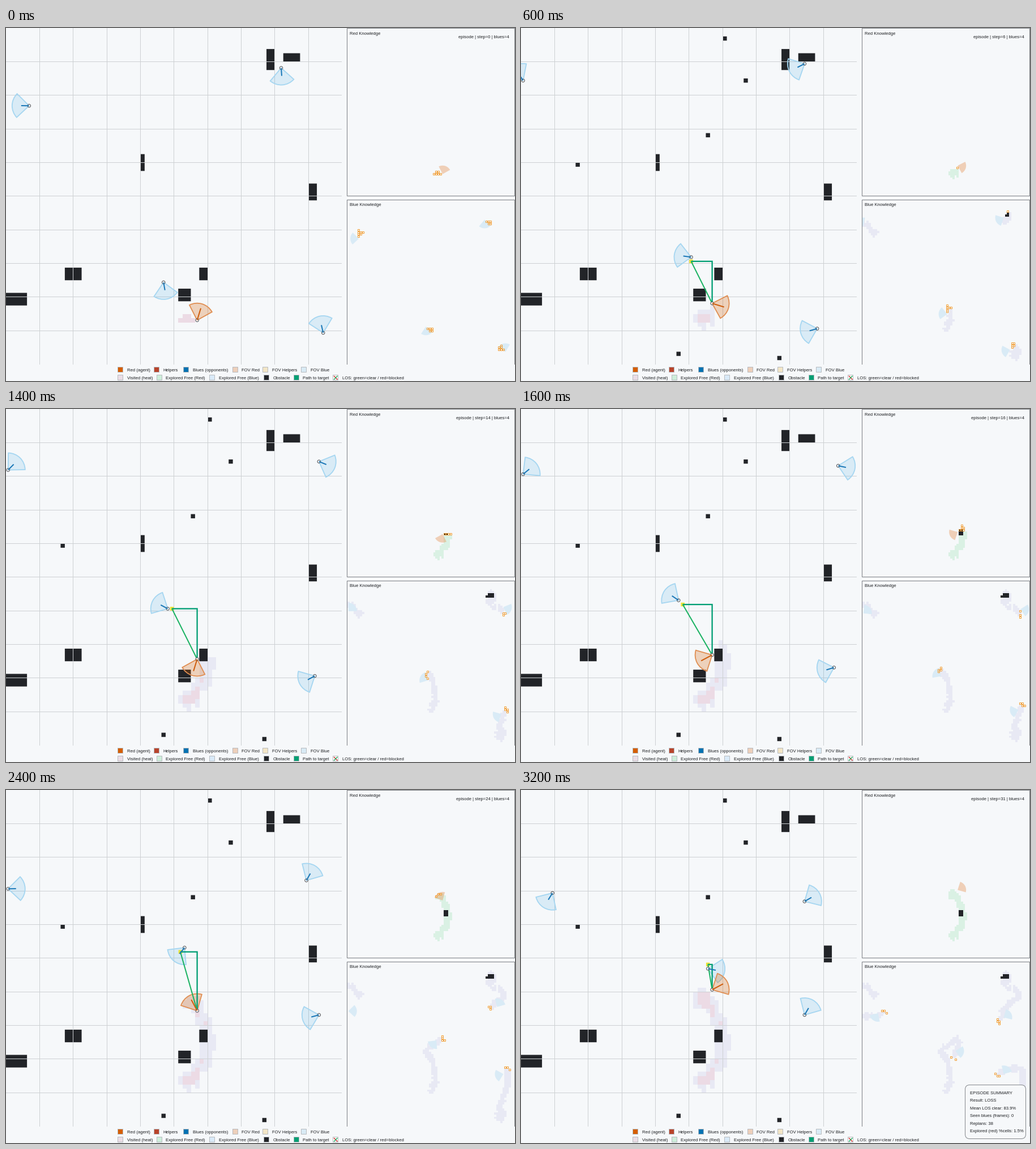
A matplotlib script for the animation above (3300 ms loop, 899 px wide and 623 px high).

```python
import math

import matplotlib.pyplot as plt
import numpy as np
from matplotlib.animation import FuncAnimation
from matplotlib.colors import to_rgba
from matplotlib.patches import Circle, FancyBboxPatch, Rectangle, Wedge

W, H, DPI = 899, 623, 100
N, STEPS = 80, 32
KEYS = [0, 6, 11, 16, 20, 24, 31]
POPUP_STEP = 3

# views: x, y, cell size
MAIN = (0, 0, 7.42)
RED_MAP = (602.8, 0.6, 3.7)
BLUE_MAP = (602.8, 303.3, 3.7)

BG, INK, DARK = "#f6f8fa", "#1c1e21", "#222428"
RED, BLUE, SKY = "#d55e00", "#0072b2", "#56b4e9"
PATH, CLEAR, BLOCKED = "#009e73", "#1ab262", "#d62728"
TRAIL, HEAT, GREEN, ORANGE = "#e8e9f4", "#ecdbe5", "#daf1e4", "#f2a038"

plt.rcParams["font.family"] = "Liberation Sans"
fig = plt.figure(figsize=(W / DPI, H / DPI), dpi=DPI, facecolor=BG)
ax = fig.add_axes([0, 0, 1, 1])
ax.axis("off")

# obstacles in cells: x, y, w, h
WALLS = [(62, 5, 2, 5), (66, 6, 4, 2), (32, 30, 1, 4), (72, 37, 2, 4),
         (46, 57, 2, 3), (41, 62, 3, 3), (14, 57, 4, 3), (0, 63, 5, 3)]
POPUPS = [(48, 2), (53, 12), (44, 25), (13, 32), (37, 77), (61, 78)]

rows, cols = np.mgrid[:N, :N]
wall_mask = np.zeros((N, N), bool)
for x, y, w, h in WALLS:
    wall_mask[y:y + h, x:x + w] = True


def sector(pos, angle):
    """Cells scanned by an agent; the sensor turns against the heading."""
    dx, dy = cols - pos[0], pos[1] - rows
    dist = np.hypot(dx, dy)
    off = (np.degrees(np.arctan2(dy, dx)) - (247 - angle) + 180) % 360 - 180
    return (dist > 0) & (dist <= 4.1) & (abs(off) <= 22.5)


class Agent:
    def scan(self):
        scans = [sector(self.pos(k), self.angle(k)) for k in range(STEPS)]
        self.counts = np.cumsum(scans, axis=0)

    def known(self, k):
        return self.counts[k] > 0 if k >= 0 else np.zeros((N, N), bool)

    def frontier(self, k):
        return self.known(k) & ~self.known(k - 1)


class Red(Agent):
    """Each step either moves up one cell or turns 45 degrees."""

    def __init__(self):
        self.scan()

    def turns(self, k):
        return int((k + 2) / 3.5)

    def pos(self, k):
        return 45, 69 - k + self.turns(k)

    def angle(self, k):
        return 73 - 45 * self.turns(k)


class Blue(Agent):
    def __init__(self, xs, ys, angles):
        self.xs, self.ys, self.angles = xs, ys, angles
        self.scan()

    def pos(self, k):
        return tuple(math.floor(np.interp(k, KEYS, v) + 0.5)
                     for v in (self.xs, self.ys))

    def angle(self, k):
        return float(np.interp(k, KEYS, self.angles))


red = Red()
chased = Blue([37, 40, 40, 37, 39, 42, 44], [60, 54, 49, 45, 41, 37, 42],
              [280, 172, 161, 146, 204, 231, 349])
blues = [
    Blue([5, 0, 0, 0, 0, 0, 7], [18, 12, 13, 15, 19, 23, 24],
         [179, 123, 54, 39, 54, 1, -122]),
    Blue([65, 67, 72, 75, 74, 71, 67], [9, 8, 10, 13, 17, 21, 26],
         [274, 207, -37, -12, 40, 60, 30]),
    chased,
    Blue([75, 70, 71, 74, 74, 74, 67], [72, 71, 66, 61, 57, 53, 53],
         [103, -164, -135, -163, -154, -165, -300])]


def pt(px):
    return px * 72 / DPI


def text(x, y, s, **kw):
    return ax.text(x, y, s, fontsize=pt(7.7), color=INK,
                   va="center_baseline", **kw)


def box(x, y, w, h, face, edge="none", lw=0, z=1):
    return ax.add_patch(Rectangle((x, y), w, h, fc=face, ec=edge,
                                  lw=pt(lw), zorder=z, snap=False))


def cells(x, y, w, h):
    s = MAIN[2]
    return box(x * s, y * s, w * s, h * s, DARK, z=2)


def centre(view, cell):
    ox, oy, s = view
    return ox + (cell[0] + 0.5) * s, oy + (cell[1] + 0.5) * s


def line(points, color, width, z):
    xs, ys = zip(*points)
    return ax.plot(xs, ys, color=color, lw=pt(width), zorder=z, snap=False,
                   solid_capstyle="butt", solid_joinstyle="miter")[0]


def fan(c, angle, r, face, edge="none", z=4):
    return ax.add_patch(Wedge(c, r, -angle - 44, -angle + 44, fc=face,
                              ec=edge, lw=pt(1.8), zorder=z))


def layer(view):
    ox, oy, s = view
    return ax.imshow(np.zeros((N, N, 4)), interpolation="nearest", zorder=1,
                     aspect="auto", extent=(ox, ox + N * s, oy + N * s, oy))


def paint(image, *masks):
    data = np.zeros((N, N, 4))
    for mask, color in masks:
        data[mask] = to_rgba(color)
    image.set_data(data)


def legend_row(y, items):
    for x, color, label in items:
        box(x + 0.5, y - 5.5, 9, 9, color or "white", "#b8bbbf", 1, 9)
        if color is None:
            line([(x + 2, y - 4), (x + 8.5, y + 2.5)], BLOCKED, 1.4, 10)
            line([(x + 2, y + 2.5), (x + 8.5, y - 4)], CLEAR, 1.4, 10)
        else:
            box(x + 1, y - 5, 8, 8, color, z=9)
        text(x + 16.5, y, label, zorder=10)


# static scene
main_layer, red_layer, blue_layer = map(layer, (MAIN, RED_MAP, BLUE_MAP))
ax.set(xlim=(0, W), ylim=(H, 0))
for wall in WALLS:
    cells(*wall)
popups = [cells(x, y, 1, 1) for x, y in POPUPS]
for i in range(1, 10):
    g = int(i * 8 * MAIN[2]) + 0.5
    line([(g, 0), (g, 594)], "#cdd0d3", 1, 3)
    line([(0, g), (593, g)], "#cdd0d3", 1, 3)
red_frame = box(602.5, 0.5, 296, 296, "none", "#7c7f83", 1, 7)
blue_frame = box(602.5, 303.5, 296, 296, "none", "#7c7f83", 1, 7)
box(0, 594, W, 29, BG, z=8)
text(607, 9, "Red Knowledge", zorder=7)
text(607, 312, "Blue Knowledge", zorder=7)
legend_row(604, [(197, RED, "Red (agent)"), (261, "#b8442c", "Helpers"),
                 (313, BLUE, "Blues (opponents)"), (400, "#edcfbb", "FOV Red"),
                 (453, "#f2e5c6", "FOV Helpers"), (521, "#d9ebf5", "FOV Blue")])
legend_row(618, [(197, "#eadde6", "Visited (heat)"),
                 (266, "#cdeeda", "Explored Free (Red)"),
                 (359, "#d9eaf8", "Explored Free (Blue)"),
                 (455, DARK, "Obstacle"), (508, PATH, "Path to target"),
                 (577, None, "LOS: green=clear / red=blocked")])
status = text(889, 15, "", ha="right", zorder=7)

# closing summary
summary = [ax.add_patch(FancyBboxPatch(
    (784.5, 520.5), 107, 95, boxstyle="round,pad=0,rounding_size=8",
    fc=BG, ec="#85888c", lw=pt(1), zorder=12, snap=False))]
for n, row in enumerate(["EPISODE SUMMARY", "Result: LOSS",
                         "Mean LOS clear: 83.9%", "Seen blues (frames): 0",
                         "Replans: 38", "Explored (red) %cells: 1.5%"]):
    summary.append(text(793, 534.5 + 13.4 * n, row, zorder=13))

live = []


def draw_agent(agent, k, color, tint, alpha, edge, stick):
    c, t = centre(MAIN, agent.pos(k)), math.radians(agent.angle(k))
    tip = (c[0] + stick * math.cos(t), c[1] - stick * math.sin(t))
    live.append(fan(c, agent.angle(k), 30, to_rgba(tint, alpha), edge))
    live.append(ax.add_patch(Circle(c, 2.7, fc="white", ec="#4a4d52",
                                    lw=pt(1), zorder=6)))
    live.append(line([c, tip], color, 2, 6.1))


def draw_map(view, image, frame, agents, k, trail, face):
    ox, oy, s = view
    before = np.any([a.known(k - 1) for a in agents], axis=0)
    seen = np.any([a.known(k) for a in agents], axis=0)
    paint(image, (before, trail), (seen & wall_mask, DARK))
    parts = []
    for agent in agents:
        parts.append(fan(centre(view, agent.pos(k)), agent.angle(k), 15, face))
        for cy, cx in np.argwhere(agent.frontier(k)):
            parts.append(box(round(ox + cx * s) + 0.5, round(oy + cy * s) + 0.5,
                             3, 3, "none", ORANGE, 1, 5))
    for p in parts:
        p.set_clip_path(frame)
    live.extend(parts)


def draw_route(k):
    goal, (rx, ry) = chased.pos(k - 1), red.pos(k)
    start, end = centre(MAIN, goal), centre(MAIN, (rx, ry))
    live.append(box(start[0] - 2.5, start[1] - 2.5, 5, 5,
                    "#d8e05a", "#f0e428", 1.5, 5))
    live.append(line([start, centre(MAIN, (rx, goal[1])), end], PATH, 2.3, 5.2))
    live.append(line([start, end], BLOCKED if k < 6 else CLEAR, 2, 5.3))


def draw(i):
    while live:
        live.pop().remove()
    k = min(i, STEPS - 1)
    status.set_text(f"episode | step={k} | blues=4")
    for s in summary:
        s.set_visible(i >= STEPS)
    for p in popups:
        p.set_visible(k >= POPUP_STEP)

    visits = red.counts[k]
    paint(main_layer, (visits > 0, TRAIL), (visits >= min(k + 1, 3), HEAT))
    for b in blues:
        draw_agent(b, k, "#1a78b8", SKY, 0.18, "#a5d6f1", 14)
    draw_agent(red, k, "#cf5d0c", RED, 0.25, "#e08e52", 22)
    if k:
        draw_route(k)
    draw_map(RED_MAP, red_layer, red_frame, [red], k, GREEN, "#e5935466")
    draw_map(BLUE_MAP, blue_layer, blue_frame, blues, k, TRAIL, "#d9ebf6")
    return live


anim = FuncAnimation(fig, draw, frames=STEPS + 1, interval=100, repeat=True,
                     repeat_delay=0, init_func=lambda: [], blit=False)
plt.show()
```
